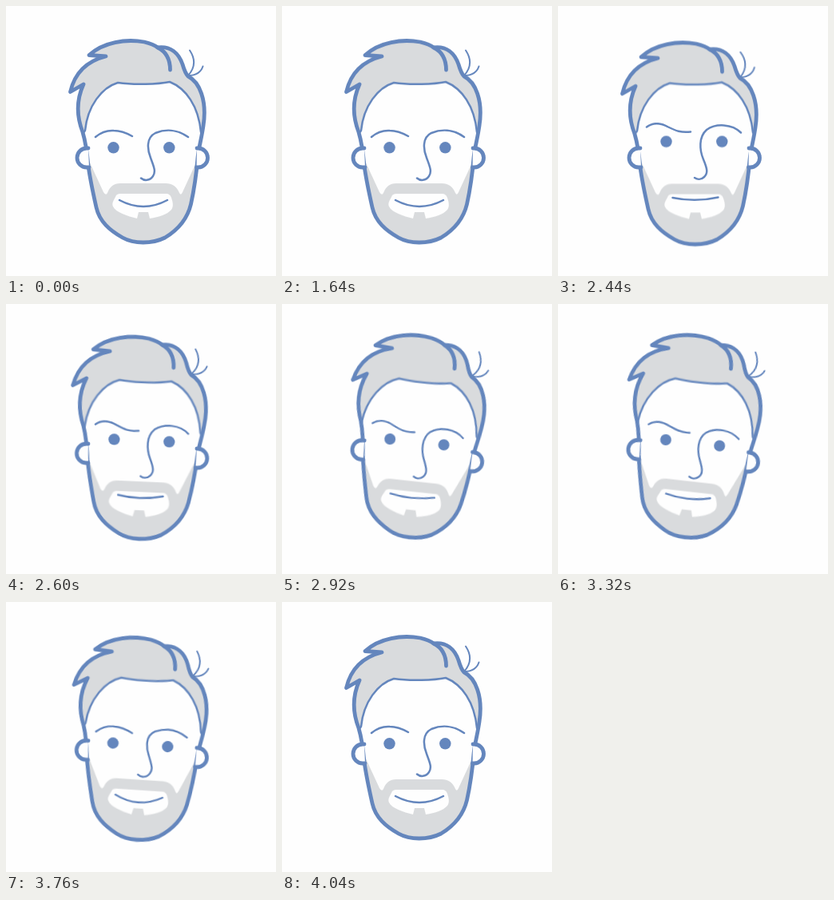
Recreate the animation shown at these times as an HTML page. Size 338 by 338 pixels, loop 5.32 s.

```html
<!DOCTYPE html>
<html lang="en">
<head>
<meta charset="utf-8">
<title>Raised eyebrow</title>
<style>
  html, body { margin: 0; width: 100%; height: 100%; overflow: hidden; background: #fefefe; }
  svg { display: block; width: 100vw; height: 100vh; --blue: #6486bd; --grey: #d9dbdd; }
  svg * { animation: 5320ms cubic-bezier(.35, 0, .1, 1) infinite; }
  .thick, .thin { fill: none; stroke: var(--blue); stroke-linecap: round; stroke-linejoin: round; }
  .thick { stroke-width: 4.8; }
  .thin { stroke-width: 2.5; }
  .strands { stroke-width: 2; }
  .skin { fill: #fefefe; }
  .grey { fill: var(--grey); }
  .eyes { fill: var(--blue); animation-name: eyes; }

  .tilt { transform-origin: 170px 190px; animation-name: tilt; }
  .head { animation-name: head; }
  .inner { animation-name: inner; }
  .face { transform-origin: 170px 205px; animation-name: face; }
  .strands { transform-origin: 228px 87px; animation-name: sway; }
  .morph { d: var(--rest); animation-name: morph; }

  .brow {
    --rest: path("M112 164C119 158 127 155.5 135 156C143 156 151 159 158 163");
    --up: path("M111 151.5C119 145.5 129 146.5 138 151.5C147 156 154 159 166 157.5");
  }
  .nose {
    --rest: path("M228 164C214 154 199 154 187 159C175 165 177 180 181 190C185 201 188 207 184 213C180 219 173 219 169 215.5");
    --up: path("M229 158.5C218 147.5 198 146.5 186 155C176 164 177 180 182 192C187 204 188 209 183 214C179 218 174 217 171 215");
  }
  .mouth {
    --rest: path("M142 243Q172 259 202 243");
    --up: path("M143.5 240Q172 246 200.5 239.5");
  }

  /* eyebrow, eyes and mouth */
  @keyframes morph {
    0%, 30.45%, 67.29%, 100% { d: var(--rest); }
    39.85%, 61.47% { d: var(--up); }
  }
  @keyframes eyes {
    0%, 30.45%, 67.29%, 100% { transform: translate(0, 0); }
    39.85%, 61.47% { transform: translate(1px, -7.6px); }
  }

  /* head tilt, with a dip before and after */
  @keyframes tilt {
    0%, 45.49%, 75.94%, 100% { transform: translate(0, 0) rotate(0deg); }
    58.65% { transform: translate(-1.5px, 0) rotate(6.4deg); }
    66.17% { transform: translate(-1.5px, 0) rotate(6.4deg); animation-timing-function: cubic-bezier(.6, 0, .4, 1); }
  }
  @keyframes head {
    0%, 30.45%, 75.94%, 100% { transform: translateY(0); }
    39.85%, 45.49% { transform: translateY(2.4px); }
    53.76% { transform: translateY(-3.5px); }
    66.17% { transform: translateY(-3.5px); animation-timing-function: ease-in-out; }
    71.43% { transform: translateY(2px); animation-timing-function: ease-in-out; }
  }
  @keyframes inner {
    0%, 30.45%, 75.94%, 100% { transform: translate(0, 0); }
    39.85%, 45.49% { transform: translate(0, -1.8px); }
    53.76% { transform: translate(-2px, 3.6px); }
    66.17% { transform: translate(-2px, 3.6px); animation-timing-function: ease-in-out; }
    71.43% { transform: translate(-1px, -1.5px); animation-timing-function: ease-in-out; }
  }
  @keyframes face {
    0%, 45.49%, 75.94%, 100% { transform: translate(0, 0) scale(1); }
    58.65% { transform: translate(-2px, 1.8px) scale(.97, .96); }
    66.17% { transform: translate(-2px, 1.8px) scale(.97, .96); animation-timing-function: ease-in-out; }
  }
  @keyframes sway {
    0%, 30.45%, 75.94%, 100% { transform: rotate(0deg); }
    39.85%, 45.49% { transform: rotate(-3deg); }
    55%, 68% { transform: rotate(7deg); }
  }
</style>
</head>
<body>
<svg viewBox="0 0 338 338">
  <defs>
    <path id="outline" d="M103 200C101 178 99 168 96 158C89 140 87 120 97 98L80.5 107.5C85 88 97 70 125 63L104 61.5C122 45 150 41 173 45C181 47 186 49 190 52C206 50 216 59 221 73C223 80 225 85 228 88C242 95 252 118 247 150C245 165 241 178 240 190C238 214 235 232 231.5 248C227 267 214 281 199 290C183 298 160 298 146 290C130 281 117 270 113 252C108.500 232 105 215 103 200Z"/>
    <clipPath id="inside"><use href="#outline"/></clipPath>
  </defs>
  <g class="tilt">
    <g class="head">
      <use href="#outline" class="grey"/>
      <g clip-path="url(#inside)">
        <g class="inner">
          <path class="thin" style="fill:#fefefe" d="M99 156C102 125 120 102 140 96C160 99 190 98 205 95C225 103 241 125 244 158L262 180V320H80V180Z"/>
          <path class="grey" d="M95 180L104 194L122 233Q125 238 127 234C130 226 135 222 143 222H200C208 222 214 226 217 234Q219 238 221 233L239 194L255 180V320H90Z"/>
          <path class="skin" d="M143 235H200C204 235 206 237 207 240C209 246 210 251 207 255C202 261 192 264 180 266L178 258H166L164 266C152 263 137 258 134 251C132 247 135 243 137 239C138 236 140 235 143 235Z"/>
        </g>
      </g>
      <use href="#outline" class="thick"/>
      <path class="thick" d="M190 52C200 57 205.500 67 205.500 80"/>
      <g class="strands thin" style="stroke-width:2">
        <path d="M230 55.500C237 66 237 77 228 87"/>
        <path d="M246.500 75.500C244 83 237 87 228 87"/>
      </g>
    </g>
    <g class="thick" style="fill:#fefefe">
      <path d="M103 178H101A12 12 0 0 0 101 202H104"/>
      <path d="M239 178H240.500A12 12 0 0 1 240.500 202H238.500"/>
    </g>
    <g class="face">
      <g class="eyes">
        <circle cx="134.500" cy="177.300" r="7.200"/>
        <circle cx="204.300" cy="177.300" r="7.200"/>
      </g>
      <path class="thin morph brow"/>
      <path class="thin morph nose"/>
      <path class="thin morph mouth"/>
    </g>
  </g>
</svg>
</body>
</html>
```
